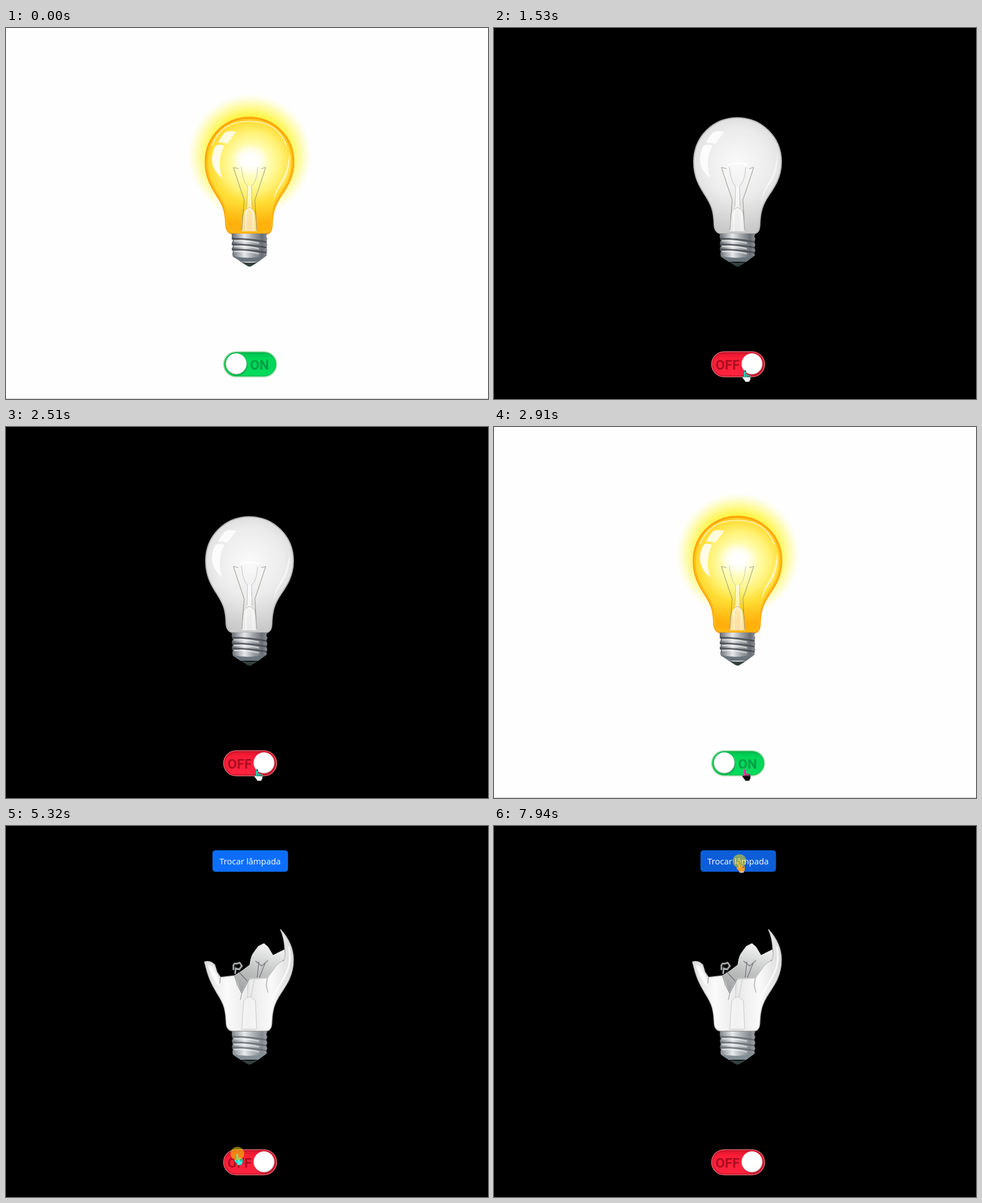
Animation of 852 by 657 pixels, one loop 8000 ms. Source, as an HTML page:

```html
<!DOCTYPE html>
<html lang="pt">
<head>
<meta charset="utf-8">
<title>Lâmpada</title>
<style>
html, body { margin: 0; width: 100%; height: 100%; overflow: hidden; background: #fefefe; }
#stage { position: relative; width: 852px; height: 657px; overflow: hidden; isolation: isolate; background: #fefefe; }
#stage > svg { position: absolute; left: 0; top: 0; display: block; }
text { font-family: "Open Sans", "Noto Sans", sans-serif; }
.label { font: 700 24px Roboto, Arial, sans-serif; }

.lit, .dim, .broken, .arrow, .hand, .hover { animation: lit 8s step-end infinite; }
.dim { animation-name: dim; }
.broken { animation-name: broken; }
.hover { animation-name: hover; }
.arrow { animation-name: arrow; }
.hand { animation-name: hand; }
.dialog { animation: dialog 8s linear infinite; }
.pointer { animation: move 8s linear infinite; mix-blend-mode: difference; }
.spot { animation: move 8s linear infinite, click 8s step-end infinite; }

@keyframes lit {
  0%, 25.5%, 36.375% { visibility: visible; }
  19.125%, 31.375%, 47.625%, 100% { visibility: hidden; }
}
@keyframes dim {
  0%, 25.5%, 36.375%, 100% { visibility: hidden; }
  19.125%, 31.375% { visibility: visible; }
}
@keyframes broken {
  0% { visibility: hidden; }
  47.625%, 100% { visibility: visible; }
}
@keyframes hover {
  0% { fill: #0d6efd; }
  93.75%, 100% { fill: #0b5ed7; }
}
@keyframes dialog {
  0%, 66.6% { opacity: 0; }
  68.25%, 88.74% { opacity: 1; }
  88.75%, 100% { opacity: 0; }
}
@keyframes click {
  0%, 19.125%, 25.5%, 31.375%, 36.375%, 45.125%, 47.625%, 66.625%, 88.75% { opacity: 0; }
  17.375%, 23.875%, 30.5%, 35.5%, 44.25%, 46%, 65%, 87%, 99.25%, 100% { opacity: .5; }
}
@keyframes arrow {
  0%, 37.6%, 57%, 84.6% { visibility: visible; }
  12%, 41%, 61.5%, 93.75%, 100% { visibility: hidden; }
}
@keyframes hand {
  0%, 37.6%, 57%, 84.6% { visibility: hidden; }
  12%, 41%, 61.5%, 93.75%, 100% { visibility: visible; }
}
@keyframes move {
  0%, 6.3% { transform: translate(602px, 670px); }
  6.375% { transform: translate(590px, 648px); animation-timing-function: ease-out; }
  14.125%, 36.4% { transform: translate(444px, 606px); animation-timing-function: ease-in-out; }
  44.25%, 52% { transform: translate(409px, 277px); }
  52.625% { transform: translate(410px, 271px); animation-timing-function: ease-in; }
  57% { transform: translate(392px, 430px); animation-timing-function: ease-out; }
  61.5% { transform: translate(407px, 574px); }
  63.2%, 74.2% { transform: translate(409px, 580px); animation-timing-function: ease-in; }
  79.25% { transform: translate(431px, 242px); animation-timing-function: ease-out; }
  84.5% { transform: translate(440px, 106px); }
  87%, 89.2% { transform: translate(414px, 88px); animation-timing-function: ease-in-out; }
  95.5%, 100% { transform: translate(434px, 62px); }
}
</style>
</head>
<body>
<div id="stage">
<svg width="852" height="657" viewBox="0 0 852 657">
  <defs>
    <radialGradient id="glow" gradientUnits="userSpaceOnUse" cx="431" cy="226" r="110">
      <stop offset=".6" stop-color="#fff02e"/>
      <stop offset=".7" stop-color="#fff64e" stop-opacity=".88"/>
      <stop offset=".84" stop-color="#fff96c" stop-opacity=".5"/>
      <stop offset=".94" stop-color="#fffb90" stop-opacity=".18"/>
      <stop offset="1" stop-color="#fffcb0" stop-opacity="0"/>
    </radialGradient>
    <radialGradient id="amber" gradientUnits="userSpaceOnUse" cx="434" cy="238" r="118">
      <stop offset=".1" stop-color="#fffee0"/>
      <stop offset=".3" stop-color="#fffba6"/>
      <stop offset=".46" stop-color="#fff173"/>
      <stop offset=".62" stop-color="#ffdd35"/>
      <stop offset=".85" stop-color="#ffcb20"/>
      <stop offset="1" stop-color="#ffb812"/>
    </radialGradient>
    <linearGradient id="neck" x2="0" y2="1">
      <stop offset="0" stop-color="#ff9f00" stop-opacity="0"/>
      <stop offset=".7" stop-color="#ff9f00" stop-opacity=".45"/>
      <stop offset="1" stop-color="#ff9f00" stop-opacity=".2"/>
    </linearGradient>
    <radialGradient id="flare">
      <stop offset=".3" stop-color="#fff"/>
      <stop offset="1" stop-color="#fff" stop-opacity="0"/>
    </radialGradient>
    <radialGradient id="clear" gradientUnits="userSpaceOnUse" cx="430" cy="240" r="120">
      <stop offset="0" stop-color="#fafafa"/>
      <stop offset=".5" stop-color="#ececec"/>
      <stop offset="1" stop-color="#c9c9c9"/>
    </radialGradient>
    <linearGradient id="front" x1="0" x2="1">
      <stop offset="0" stop-color="#ddd"/>
      <stop offset=".25" stop-color="#fbfbfb"/>
      <stop offset=".5" stop-color="#e8e8e8"/>
      <stop offset=".75" stop-color="#fafafa"/>
      <stop offset="1" stop-color="#dadada"/>
    </linearGradient>
    <linearGradient id="back" x1=".6" y1="0" x2=".3" y2="1">
      <stop offset="0" stop-color="#f4f4f4"/>
      <stop offset=".55" stop-color="#c0c2c2"/>
      <stop offset="1" stop-color="#a0a2a3"/>
    </linearGradient>
    <linearGradient id="metal" x1="0" x2="1">
      <stop offset="0" stop-color="#65696e"/>
      <stop offset=".16" stop-color="#a0a4a8"/>
      <stop offset=".36" stop-color="#e6e8ea"/>
      <stop offset=".6" stop-color="#a1a5a9"/>
      <stop offset=".85" stop-color="#6b7076"/>
      <stop offset="1" stop-color="#8d9196"/>
    </linearGradient>
    <linearGradient id="green" x2="0" y2="1">
      <stop offset="0" stop-color="#00b84b"/>
      <stop offset=".25" stop-color="#00d658"/>
      <stop offset="1" stop-color="#04dc5e"/>
    </linearGradient>
    <linearGradient id="red" x2="0" y2="1">
      <stop offset="0" stop-color="#d9152c"/>
      <stop offset=".25" stop-color="#fc1e37"/>
      <stop offset="1" stop-color="#ff2440"/>
    </linearGradient>

    <path id="glass" d="M430 159C387 159 353 193 353 237C353 263 362 279 373 296C386 316 388 326 389 346C389 356 393 364 402 364H459C467 364 470 357 470 346C471 326 474 314 486 296C497 280 508 263 508 237C508 193 473 159 430 159Z"/>

    <g id="shine" fill="#fff">
      <path d="M388 184Q397 181 407 184L391 205Q383 202 375 203Q380 192 388 184Z" opacity=".8"/>
      <path d="M371 208Q379 205 386 209Q378 222 378 240Q378 254 382 266Q365 252 364 234Q364 219 371 208Z" opacity=".85"/>
      <path d="M501 220Q504 252 488 276Q476 292 472 309Q474 290 485 274Q499 252 501 220Z" opacity=".6"/>
    </g>

    <g id="wires" fill="none" stroke-linejoin="round">
      <path d="M417 360Q417 325 426 319V280H434V319Q443 325 443 360Z" fill="#fff" opacity=".6"/>
      <path d="M427 280Q419 274 416 246M434 280Q443 274 445 246M427 280L426 316M434 280L435 316" stroke="#aaa" opacity=".7"/>
      <path d="M417 358L421 304Q414 284 402 247L411 249M451 249L459 247Q447 284 440 304L443 358" stroke="#8a8c80" stroke-width="1.2" opacity=".75"/>
      <path d="M413 242Q431 237 448 242" stroke="#fff" stroke-width="2.5"/>
      <path d="M424 360V328Q430 311 437 328V360" stroke="#fff" stroke-width="2" opacity=".6"/>
      <path d="M425 322Q430 314 436 322M418 340L420 322M442 340L440 322" stroke="#8a8c80" opacity=".6"/>
    </g>

    <g id="base">
      <path d="M399 364H462L460 369L462 373L460 379L462 384L460 389L462 394L460 398L461 403L446 414H415L401 405L400 400L401 396L399 391L401 386L399 381L401 376L399 371Z" fill="url(#metal)"/>
      <g fill="none" stroke="#3f444a" stroke-width="2.8">
        <path id="thread" d="M399 373Q430 373 461 379" opacity=".8"/>
        <use href="#thread" y="10"/>
        <use href="#thread" y="19"/>
      </g>
      <g fill="none" stroke="#fff" stroke-width="1.8" opacity=".65">
        <path id="edge" d="M403 377Q426 376 447 381"/>
        <use href="#edge" y="10"/>
        <use href="#edge" y="19"/>
      </g>
      <path d="M402 404Q430 411 460 402L446 414H415Z" fill="#6a757d"/>
      <path d="M415 414Q431 417 446 414L435 421Q431 424 426 421Z" fill="#34403f"/>
    </g>

    <g id="knob">
      <circle cx="1" cy="2" r="18.8" fill="#000" opacity=".2"/>
      <circle r="18.5" fill="#d6d6d6"/>
      <circle cy="-1" r="17.8" fill="#fff"/>
    </g>

    <g id="off">
      <rect x="384.7" y="573.2" width="93.6" height="44.6" rx="22.3" fill="url(#red)" stroke="#e0656f" stroke-width="1.6"/>
      <rect x="386.5" y="575" width="90" height="41" rx="20.5" fill="none" stroke="#b80d22" stroke-width="2" opacity=".55"/>
      <text class="label" x="391.5" y="605" fill="#ae0d20">OFF</text>
      <use href="#knob" x="456" y="595"/>
    </g>
  </defs>

  <g class="lit">
    <path d="M0 656.5H852" stroke="#c6c6c6"/>
    <circle cx="431" cy="226" r="110" fill="url(#glow)"/>
    <use href="#glass" fill="url(#amber)" stroke="#ffa20a" stroke-width="3.4"/>
    <use href="#glass" fill="none" stroke="#ffbf1c" stroke-width="4" opacity=".7" transform="translate(13 8) scale(.97)"/>
    <path d="M364 208Q380 165 430 165Q480 165 496 208" fill="none" stroke="#fff6b8" stroke-width="2.2" opacity=".85"/>
    <path d="M390 310H470L468 350Q467 361 459 361H402Q393 361 392 350Z" fill="url(#neck)"/>
    <ellipse cx="431" cy="233" rx="34" ry="28" fill="url(#flare)"/>
    <use href="#shine"/>
    <use href="#wires"/>
    <use href="#base"/>
    <rect x="384.7" y="573.2" width="93.6" height="44.6" rx="22.3" fill="url(#green)" stroke="#a9dfb4" stroke-width="2"/>
    <rect x="386.5" y="575" width="90" height="41" rx="20.5" fill="none" stroke="#00a544" stroke-width="1.6" opacity=".5"/>
    <text class="label" x="431.5" y="604.5" fill="#00a045">ON</text>
    <use href="#knob" x="407" y="595"/>
  </g>

  <g class="dim">
    <rect width="852" height="657"/>
    <use href="#glass" fill="url(#clear)" stroke="#b5b5b5" stroke-width="2"/>
    <use href="#shine"/>
    <use href="#wires"/>
    <use href="#base"/>
    <use href="#off"/>
  </g>

  <g class="broken">
    <rect width="852" height="657"/>
    <path d="M404 265L418 256L431 246Q433 230 438 224L446 213L456 208L463 214L472 229L492 219L493 235L478 247L462 270H430L416 296Z" fill="url(#back)" stroke="#ddd"/>
    <path d="M447 240L444 268M458 243L448 268M441 239L452 248L463 238M411 258L428 276" fill="none" stroke="#6c7072" stroke-width="1.2"/>
    <path d="M402 255V247Q403 242 408 244L413 242L417 248L412 254L406 252L405 262" fill="none" stroke="#a5a9aa" stroke-width="3"/>
    <path d="M351 241Q360 237 369 246L373 259L379 268L404 265L416 296L430 271L462 269L478 247Q486 238 491 239Q495 230 493 219Q492 198 485 183Q508 208 508 237C508 263 497 280 486 296C474 314 471 326 470 346Q470 363 459 363H402Q389 363 389 346C388 326 386 316 373 296C360 274 357 265 351 241Z" fill="url(#front)" stroke="#c4c4c4" stroke-width="1.5"/>
    <path d="M357 246Q361 265 377 285L374 268L364 248Z" fill="#fff" opacity=".8"/>
    <path d="M500 214Q507 246 487 276Q474 294 472 309" fill="none" stroke="#fff" stroke-width="3" opacity=".8"/>
    <path d="M417 360L420 310L427 303H433L441 310L443 360ZM427 303L428 276M433 303L439 272" fill="#fff" fill-opacity=".5" stroke="#bdbdbd" opacity=".8"/>
    <path d="M404 265L409 282L417 296L414 308M379 268L378 279M462 269L460 282L463 295M430 271L417 296" fill="none" stroke="#8c8f90"/>
    <use href="#base"/>
    <path d="M400 364H460V403L446 414H415L401 404Z" fill="#e4f0f5" opacity=".2"/>
    <use href="#off"/>
    <rect class="hover" x="365" y="43" width="133.5" height="38" rx="5.5"/>
    <text x="431.5" y="68" font-size="14.9" text-anchor="middle" fill="#fff">Trocar lâmpada</text>
  </g>

  <g class="dialog">
    <path d="M7 0H455V115Q455 119 451 119H11Q7 119 7 115Z" fill="#292a2d"/>
    <g fill="#e8eaed">
      <text x="23" y="22" font-size="14">192.0.2.8:4300 diz</text>
      <text x="23" y="50.5" font-size="12.3">A lâmpada está quebrada, faça a troca para poder acendê-la</text>
    </g>
    <rect x="375" y="71" width="64" height="32" rx="4" fill="#202a3c" stroke="#8ab4f8" stroke-width="2"/>
    <rect x="377.5" y="73.5" width="59" height="27" rx="2.5" fill="#8ab4f8"/>
    <text x="406.5" y="91.2" font-size="11.8" text-anchor="middle" fill="#202124">OK</text>
  </g>
</svg>

<svg class="pointer" width="1" height="1" overflow="visible" fill="#fff">
  <path class="arrow" d="M0 0V16L4 12.5L6.5 18.5L9 17.4L6.5 11.6H11.5Z"/>
  <g class="hand">
    <path d="M-2 2a1.7 1.7 0 0 1 3.4 0V8C2 7 4.3 7 4.5 8.5C5 7.6 7 7.9 7 9.3C7.5 8.6 9.3 9 9.3 10.5V15C9.3 18 7.3 18 7.3 20.5H0C0 18 -2 17 -4.6 13.4C-5.8 11.8 -4.6 10.2 -3.2 11L-2 12Z"/>
    <path d="M1.4 8V11M4.5 8.5V11.5M7 9.3V12" stroke="#000" stroke-width=".8"/>
  </g>
</svg>
<svg class="spot" width="1" height="1" overflow="visible"><circle r="12" fill="#ffe600"/></svg>
</div>
</body>
</html>
```
